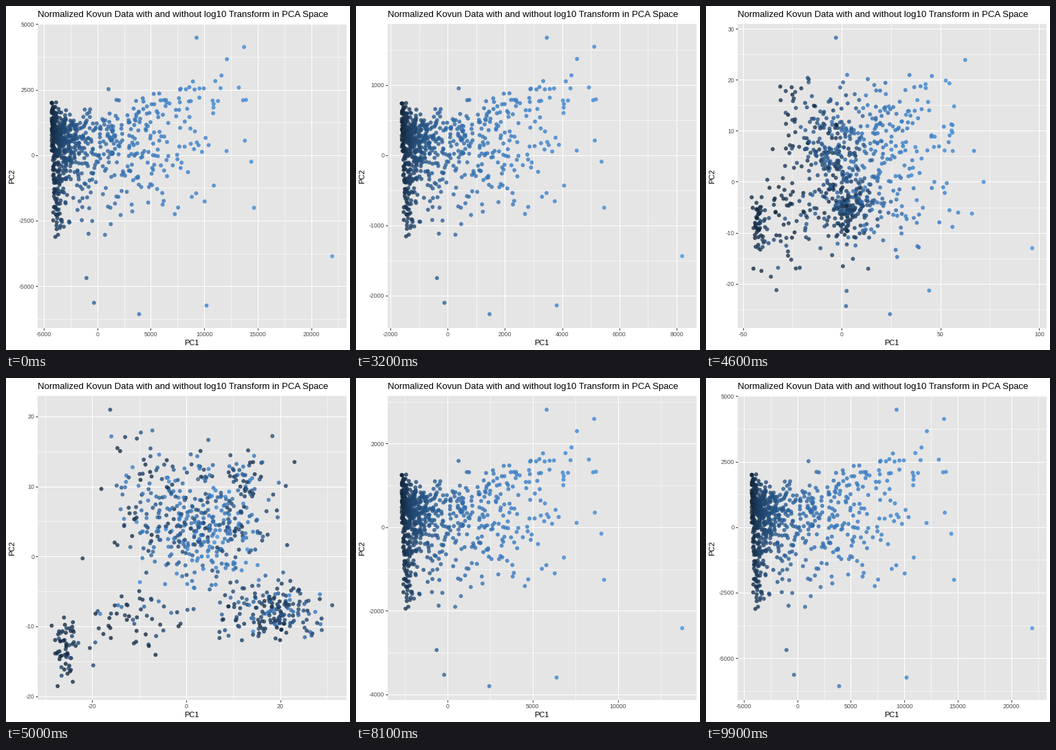
Animation, 500 px wide and 500 px high, one loop 10 s. Source, as a matplotlib script:

```python
import numpy as np
import matplotlib.pyplot as plt
from matplotlib.animation import FuncAnimation

plt.rcParams["font.family"] = "Liberation Sans"
plt.rcParams["axes.unicode_minus"] = False

SIZE = 500
PT = 0.72  # points per pixel at 100 dpi
LEFT, TOP, WIDTH, HEIGHT = 46, 26, 448.5, 442
STEPS, HOLD = 25, 25
EDGE = -4264  # smallest untransformed PC1

# Outlying cells that set the view: raw PC1, PC2, log PC1, PC2
OUTLIERS = np.array([
    (21950, -3860, 6.6, 2.8), (13720, 4130, 6.4, 7), (9280, 4485, 4.6, 0),
    (12110, 3666, 5, 4.3), (3910, -6071, 8.5, -1.1), (10210, -5743, 2.5, 2.2),
    (-302, -5637, 3.5, -1.3), (-1010, -4691, 6.7, -2.2), (14390, -250, 13, 1),
    (14650, -2010, 6, 2), (1050, 2520, -7.2, 18),
])

# Log-space clusters: centre x, centre y, spread x, spread y
CLUSTERS = {
    "sparse": (-26, -13, 1.6, 2.2),
    "left": (-11, -9, 6, 2.5),
    "right": (18, -8, 5, 2),
    "top": (-7, 8, 6, 4.5),
    "upper": (9, 7, 6, 4),
    "middle": (3, 4, 6.5, 4.5),
}

rng = np.random.default_rng(8)


def log_cells(n, **weights):
    """Cells drawn from weighted clusters, with bounded bell-shaped noise."""
    centres = np.array([CLUSTERS[name] for name in weights])
    pick = centres[rng.choice(len(centres), n, p=list(weights.values()))]
    noise = 2 * (rng.random((3, n, 2)).sum(axis=0) - 1.5)
    return pick[:, :2] + noise * pick[:, 2:]


def group(x, y, **weights):
    return np.column_stack([x, y, log_cells(len(x), **weights)])


def make_cells():
    n = 135
    x = EDGE + rng.exponential(430, n)
    y = 2200 - 0.35 * (x - EDGE) - 2500 * rng.beta(2, 2.6, n)
    core = group(x, y, sparse=0.4, left=0.2, right=0.25, top=0.15)

    n = 130
    x = -3900 + rng.gamma(1.6, 700, n)
    band = group(x, rng.normal(720, 380, n),
                 left=0.08, right=0.7, top=0.12, upper=0.1)

    n = 120
    x = -4180 + rng.gamma(1.5, 430, n)
    tail = group(x, 300 - 3700 * rng.beta(1.1, 1.6, n),
                 left=0.1, right=0.15, top=0.2, upper=0.55)

    n = 370
    x = -3200 + 17500 * rng.beta(1, 2.2, n)
    high = 1600 + 0.12 * (x + 3000)
    y = high - (high + 3300) * rng.beta(1.5, 2.5, n)
    fan = group(x, y, left=0.03, right=0.1, top=0.07, upper=0.15, middle=0.65)

    cells = rng.permutation(np.vstack([OUTLIERS, core, band, tail, fan]))
    return cells[:, :2], cells[:, 2:]


def breaks(lo, hi, m=5):
    """Wilkinson-extended tick positions, with the step between them."""
    span = hi - lo
    best, found = -9, None
    power = int(np.floor(np.log10(span)))
    for i, q in enumerate((1, 5, 2, 2.5, 4, 3)):
        for z in (power - 2, power - 1, power):
            step = q * 10.0 ** z
            if not 1 <= span / step <= 14:
                continue
            first = int(np.floor(lo / step))
            for start in (first, first + 1, first + 2):
                for k in range(2, 11):
                    a, b = start * step, (start + k - 1) * step
                    simple = 1 - i / 5 - (0 if a <= 0 <= b else 1)
                    cover = 1 - 0.5 * ((hi - b) ** 2 + (lo - a) ** 2) / (0.1 * span) ** 2
                    ratio = (k - 1) / (b - a) * (max(b, hi) - min(a, lo)) / (m - 1)
                    dense = 2 - max(ratio, 1 / ratio)
                    score = 0.25 * simple + 0.2 * cover + 0.5 * dense
                    if score > best:
                        best, found = score, (a, step, k)
    a, step, k = found
    return a + step * np.arange(k), step


def raw_share(frame):
    """Weight of the untransformed layout, cubic ease-out both ways."""
    if frame < 2 * HOLD + STEPS:
        done = np.clip((frame - HOLD) / STEPS, 0, 1)
        return (1 - done) ** 3
    done = (frame - 2 * HOLD - STEPS + 1) / STEPS
    return 1 - (1 - done) ** 3


RAW, LOG = make_cells()
shade = np.log((RAW[:, :1] + 4700) / 436) / np.log(26650 / 436)
DARK, BRIGHT = np.array([19, 38, 60]) / 255, np.array([66, 147, 232]) / 255
colors = DARK + (BRIGHT - DARK) * np.clip(shade, 0, 1)

fig = plt.figure(figsize=(SIZE / 100, SIZE / 100), dpi=100, facecolor="white")
ax = fig.add_axes([LEFT / SIZE, 1 - (TOP + HEIGHT) / SIZE, WIDTH / SIZE, HEIGHT / SIZE],
                  facecolor="#e5e5e5")
ax.set_axisbelow(True)
for spine in ax.spines.values():
    spine.set_visible(False)
ax.grid(True, which="major", color="white", lw=1.07 * PT)
ax.grid(True, which="minor", color="white", lw=0.55 * PT)
ax.tick_params(which="major", length=2.75 * PT, width=1.07 * PT, pad=2.2 * PT,
               color="#333333", labelcolor="#4d4d4d", labelsize=8.8 * PT)
ax.tick_params(which="minor", length=0)


def label(x, y, text, size, **style):
    fig.text(x / SIZE, 1 - y / SIZE, text, fontsize=size * PT, **style)


label(LEFT, 16, "Normalized Kovun Data with and without log10 Transform in PCA Space",
      13.2, va="baseline")
label(LEFT + WIDTH / 2, 493, "PC1", 11, ha="center", va="baseline")
label(9.5, TOP + HEIGHT / 2, "PC2", 11, ha="center", va="center", rotation=90)

cells = ax.scatter(RAW[:, 0], RAW[:, 1], s=(5.9 * PT) ** 2, c=colors, alpha=0.8,
                   linewidths=0)


def fit(values, set_ticks, set_lim):
    lo, hi = values.min(), values.max()
    pad = 0.05 * (hi - lo)
    lo, hi = lo - pad, hi + pad
    major, step = breaks(lo, hi)
    minor = np.append(major - step / 2, major[-1] + step / 2)
    major = major[(major >= lo) & (major <= hi)]
    minor = minor[(minor >= lo) & (minor <= hi)]
    set_ticks(major, [f"{v:g}" for v in major])
    set_ticks(minor, minor=True)
    set_lim(lo, hi)


def draw(frame):
    share = raw_share(frame)
    pos = RAW * share + LOG * (1 - share)
    cells.set_offsets(pos)
    fit(pos[:, 0], ax.set_xticks, ax.set_xlim)
    fit(pos[:, 1], ax.set_yticks, ax.set_ylim)
    return (cells,)


anim = FuncAnimation(fig, draw, frames=100, interval=100, repeat=True,
                     repeat_delay=0, blit=False)
plt.show()
```
